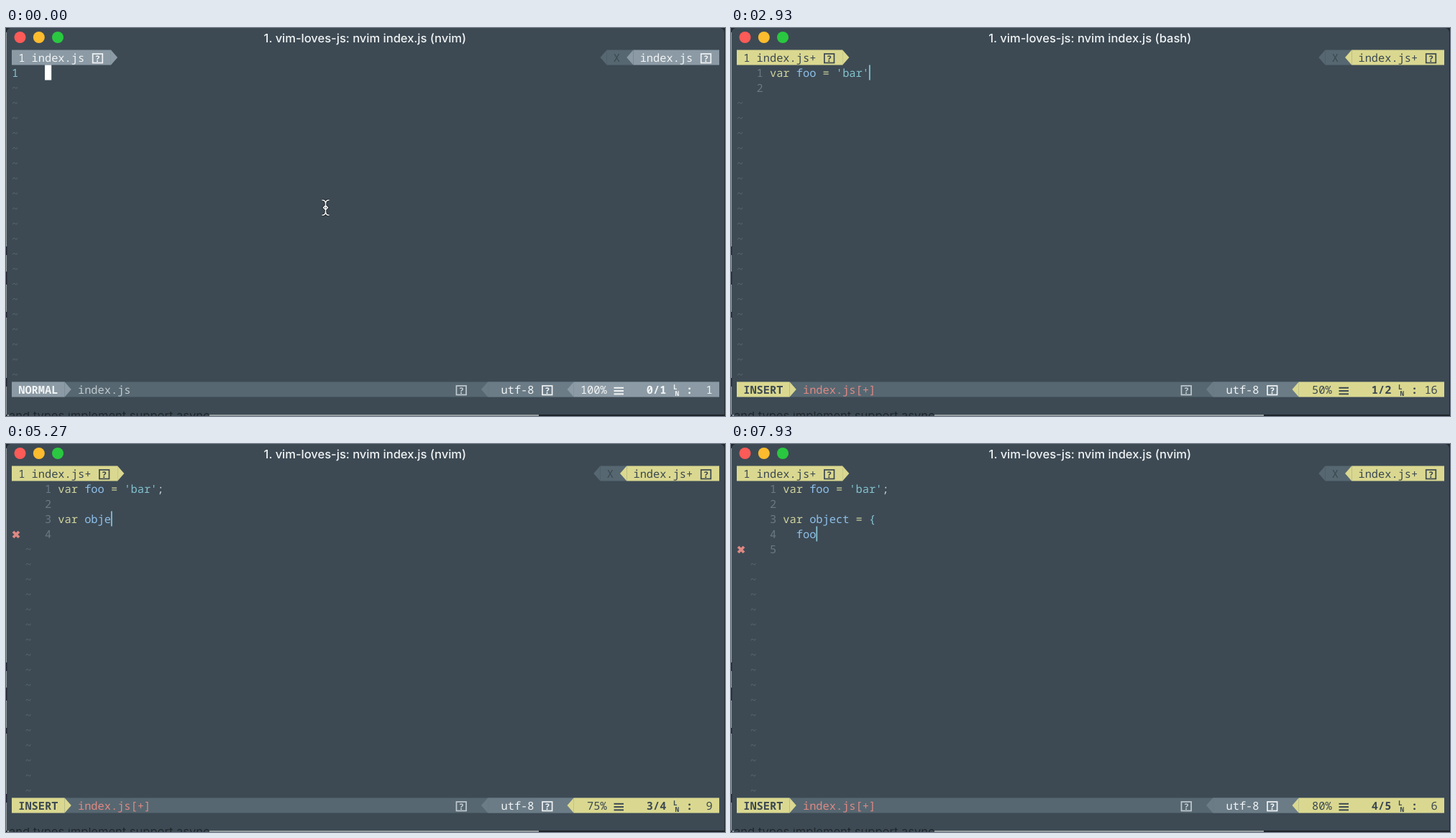
Animation of 1000 by 540 pixels, one loop 8 s. Source, as an HTML page with a canvas:

```html
<!DOCTYPE html>
<html lang="en">
<head>
<meta charset="utf-8">
<title>nvim index.js</title>
<style>
html, body { margin: 0; width: 100%; height: 100%; overflow: hidden; background: #3d4a54; }
canvas { display: block; width: 1000px; height: 540px; }
</style>
</head>
<body>
<canvas id="screen" width="1000" height="540"></canvas>
<script>
const LOOP = 8000;
const COLS = 107, CELL = 984 / COLS, LINE = 21, LEFT = 8, TOP = 30.5, STATUS = 22;
const MONO = "15.33px 'Noto Sans Mono', 'DejaVu Sans Mono', monospace";
const SANS = "Inter, Roboto, sans-serif";

const C = {
  bg: '#3d4a54', bar: '#566771', mid: '#6b7c87', grey: '#8b9aa4', yellow: '#dad890',
  white: '#f1f4f5', soft: '#c0c9ce', dark: '#3b4851', num: '#6a7983', tilde: '#56656e',
  teal: '#84c2ce', blue: '#8fc0ea', key: '#d2d59d', red: '#df8983'
};

// Typed runs: start time, time per key, keys.
const RUNS = [
  [500, 190, 'var foo'],
  [1950, 125, " = 'bar'"],
  [3130, 190, ';\n\n'],
  [3720, 0, 'v'],
  [3920, 205, 'ar obje'],
  [5380, 200, 'ct = {'],
  [6900, 0, '\n'],
  [7300, 200, 'foo']
];
const INSERT_AT = 330;
const LINT = { start: 2870, end: 3070, moved: 4150 };

const g = document.getElementById('screen').getContext('2d');
const colX = c => LEFT + c * CELL;
const rowY = r => TOP + r * LINE;

function rect(x, y, w, h, color) {
  g.fillStyle = color;
  g.fillRect(x, y, w, h);
}

function cells(from, to, row, color) {
  rect(colX(from), rowY(row), (to - from) * CELL, LINE, color);
}

function poly(color, ...pts) {
  g.fillStyle = color;
  g.beginPath();
  pts.forEach(([x, y]) => g.lineTo(x, y));
  g.fill();
}

// Powerline separator filling one cell; dir 1 points right, -1 left.
function arrow(col, row, dir, color) {
  const x = colX(dir > 0 ? col : col + 1), y = rowY(row);
  poly(color, [x, y], [x + dir * CELL, y + LINE / 2], [x, y + LINE]);
}

function text(str, col, row, color, bold) {
  g.font = (bold ? 'bold ' : '') + MONO;
  g.fillStyle = color;
  [...str].forEach((ch, i) => g.fillText(ch, colX(col + i), rowY(row) + 16.7));
}

function badge(col, row, color) {
  const x = colX(col) + 2.3, y = rowY(row) + 5.5;
  g.strokeStyle = color;
  g.lineWidth = 1.7;
  g.strokeRect(x, y, 13.6, 12.5);
  g.font = "bold 12px 'Noto Sans Mono', monospace";
  g.fillStyle = color;
  g.fillText('?', x + 3.2, y + 10.7);
}

function dot(x, color) {
  g.fillStyle = color;
  g.beginPath();
  g.arc(x, 13, 8, 0, 7);
  g.fill();
}

function typedAt(t) {
  let out = '';
  for (const [start, step, keys] of RUNS) {
    [...keys].forEach((k, i) => { if (t >= start + i * step) out += k; });
  }
  return out.replace('{\n', '{\n  ');
}

function drawWindow(title) {
  rect(0, 0, 1000, 540, '#20282d');
  g.fillStyle = C.bg;
  g.beginPath();
  g.roundRect(1, 0, 998, 540, [6, 6, 0, 0]);
  g.fill();
  dot(19.5, '#fc5b57');
  dot(45.8, '#fdbc2e');
  dot(72, '#2ac840');
  g.font = '500 16.5px ' + SANS;
  g.fillStyle = C.white;
  g.textAlign = 'center';
  g.fillText(title, 499.3, 19.6);
  g.textAlign = 'left';

  // Slivers of the window behind
  rect(0, 6, 1, 532, '#969c9f');
  [[304, 12], [339, 18], [395, 8], [487, 12]].forEach(([y, h]) => rect(0, y, 1.4, h, '#252538'));
  g.save();
  g.beginPath();
  g.rect(2, 534, 300, 6);
  g.clip();
  g.font = '16.5px ' + SANS;
  g.fillStyle = '#1e262b';
  g.fillText('and types implement support async', 4, 545);
  g.restore();
  rect(2, 538, 2, 2, '#929a9d');
  rect(283, 538, 458, 2, '#929a9d');
  rect(741, 538, 259, 2, '#1c2328');
}

function drawTabs(insert) {
  const name = insert ? 'index.js+' : 'index.js';
  const fill = insert ? C.yellow : C.grey, ink = insert ? C.dark : C.white;
  const n = name.length, right = 101 - n;
  cells(0, n + 7, 0, fill);
  arrow(n + 7, 0, 1, fill);
  text('1 ' + name, 1, 0, ink);
  badge(n + 4, 0, ink);
  arrow(right - 4, 0, -1, C.bar);
  cells(right - 3, right + 1, 0, C.bar);
  text('X', right - 2, 0, C.dark);
  arrow(right, 0, -1, fill);
  cells(right + 1, COLS, 0, fill);
  text(name, right + 2, 0, ink);
  badge(104, 0, ink);
}

function drawStatus(insert, line, total, col) {
  const r = STATUS, y = rowY(r);
  const fill = insert ? C.yellow : C.grey, ink = insert ? C.dark : C.white;
  cells(0, COLS, r, C.bar);
  cells(0, 8, r, fill);
  arrow(8, r, 1, fill);
  text(insert ? 'INSERT' : 'NORMAL', 1, r, ink, true);
  text(insert ? 'index.js[+]' : 'index.js', 10, r, insert ? C.red : C.soft);
  badge(67, r, C.soft);
  arrow(71, r, -1, C.mid);
  cells(72, 85, r, C.mid);
  text('utf-8', 74, r, C.white);
  badge(80, r, C.white);
  arrow(84, r, -1, fill);
  cells(85, COLS, r, fill);
  const percent = insert ? Math.floor(100 * line / total) : 100;
  text((percent + '%').padStart(4), 86, r, ink);
  for (let i = 0; i < 3; i++) rect(845.5, y + 7.3 + i * 4.3, 13.5, 2, ink);
  text(`${line}/${total}`, 96, r, ink, true);
  g.font = "bold 9.5px 'Noto Sans Mono', monospace";
  g.fillText('L', 928, y + 10);
  g.fillText('N', 930.5, y + 19.5);
  text(':', 102, r, ink, true);
  text(String(col).padStart(2), 104, r, ink);
}

function drawCode(str, col, row, badQuote) {
  for (const m of str.matchAll(/'[^']*'?|\w+|[^\s\w]/g)) {
    const tok = m[0];
    let color = C.soft;
    if (tok === 'var' || tok === '=') color = C.key;
    else if (tok[0] === "'" || tok === '{') color = C.teal;
    else if (/\w/.test(tok) && m.index > 0) color = C.blue;
    text(tok, col + m.index, row, color);
    if (badQuote && tok[0] === "'") text("'", col + m.index, row, C.red);
  }
}

function drawCross(row) {
  const x = 14, y = rowY(row) + 11.5, d = 4;
  g.strokeStyle = C.red;
  g.lineWidth = 3.8;
  g.beginPath();
  g.moveTo(x - d, y - d); g.lineTo(x + d, y + d);
  g.moveTo(x + d, y - d); g.lineTo(x - d, y + d);
  g.stroke();
}

function drawPointer(x, y) {
  const beam = new Path2D(`M${x - 5} ${y - 10.5}q5 0 5 5v11q0 5-5 5
    M${x + 5} ${y - 10.5}q-5 0-5 5v11q0 5 5 5M${x - 3} ${y}l3-3 3 3-3 3z`);
  [['#1d2327', 3.4], ['#f4f6f6', 1.5]].forEach(([color, w]) => {
    g.strokeStyle = color;
    g.lineWidth = w;
    g.stroke(beam);
  });
}

function draw(t) {
  const insert = t >= INSERT_AT;
  const lines = typedAt(t).split('\n');
  const cur = lines.length, last = lines[cur - 1];
  const total = insert ? cur + 1 : 1;
  const signs = t >= LINT.end, moved = t >= LINT.moved;
  const shift = signs ? 2 : 0, code = 5 + shift;

  drawWindow(`1. vim-loves-js: nvim index.js (${t >= LINT.start && t < LINT.end ? 'bash' : 'nvim'})`);
  drawTabs(insert);
  for (let r = total + 1; r < STATUS; r++) text('~', shift, r, C.tilde);

  if (insert) {
    for (let r = 1; r <= total; r++) text(String(r), 3 + shift, r, C.num);
    lines.forEach((s, i) => drawCode(s, code, i + 1, signs && !moved));
    if (signs) drawCross(moved ? total : 1);
    rect(colX(code + last.length), rowY(cur), 1.8, LINE, C.teal);
  } else {
    text('1', 0, 1, C.teal);
    rect(colX(code), rowY(1), CELL, LINE, '#ffffff');
    drawPointer(444.5, 250);
  }
  drawStatus(insert, insert ? cur : 0, total, last.length + 1);
}

function tick(now) {
  draw(now % LOOP);
  requestAnimationFrame(tick);
}
g.textRendering = 'geometricPrecision';
draw(0);
requestAnimationFrame(tick);
</script>
</body>
</html>
```
